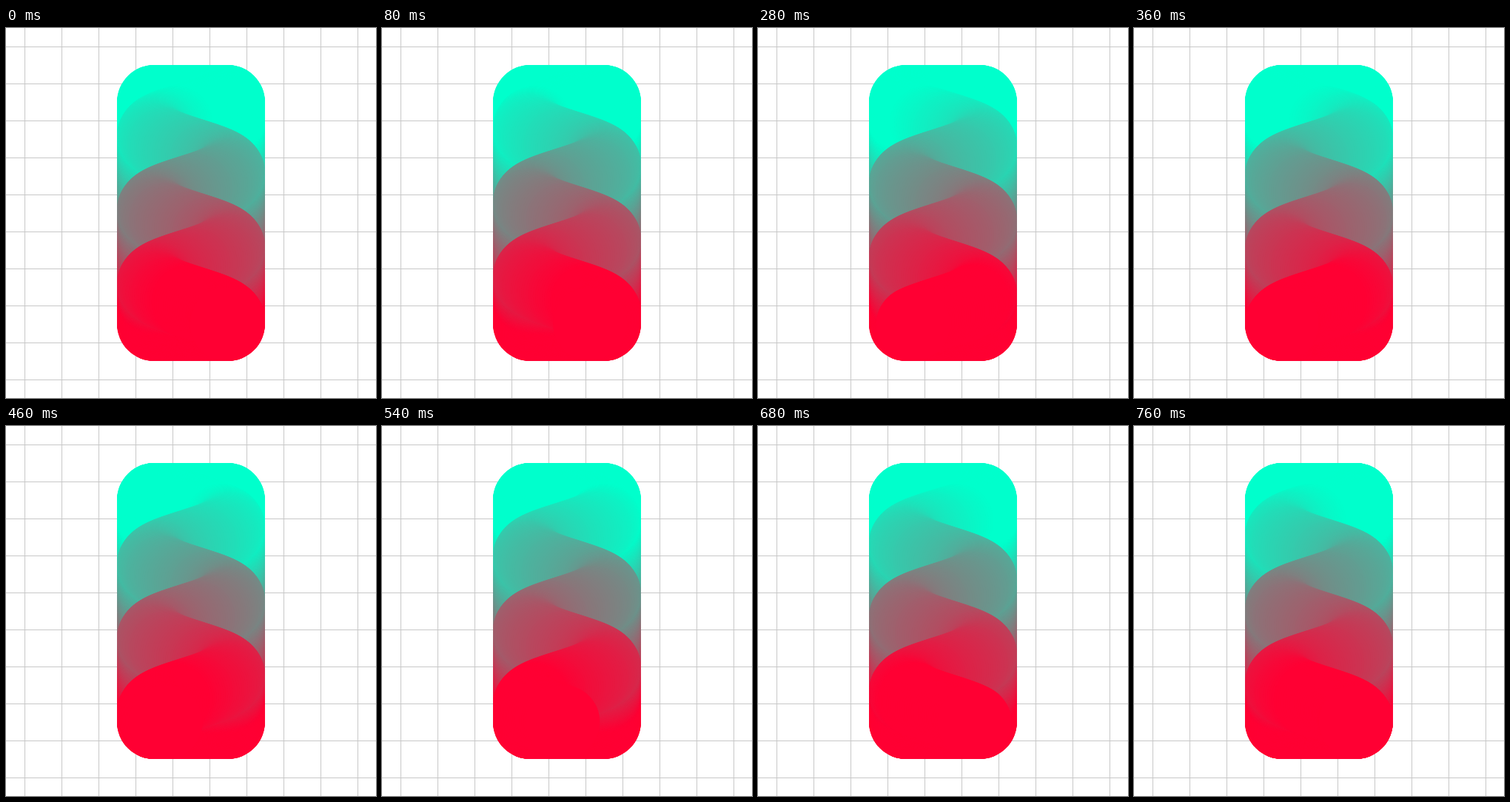
Write an HTML page with a canvas that moves like this. It is 500x500 px and loops after 780 ms.

```html
<!DOCTYPE html>
<html lang="en">
<head>
<meta charset="utf-8">
<title>Ribbon</title>
<style>
  html, body { margin: 0; width: 100%; height: 100%; overflow: hidden; background: #fff; }
  canvas { display: block; width: 500px; height: 500px; }
</style>
</head>
<body>
<canvas id="stage" width="500" height="500"></canvas>
<script>
const SIZE = 500, STEPS = 39, STEP_MS = 20;
const TOP = 100, BOTTOM = 400, CENTER = 250, RADIUS = 50;
const SWING = 50, WAVE = 100, CREST = 196;
const FADE_START = 127, FADE_END = 370;
const BOX = { x: 148, y: 48, w: 204, h: 404 };
const START_COLOR = [0, 255, 204], END_COLOR = [255, 0, 51];

function makeCanvas(w, h) {
  const canvas = document.createElement('canvas');
  canvas.width = w;
  canvas.height = h;
  return canvas;
}

function colorAt(y) {
  const p = Math.min(1, Math.max(0, (y - FADE_START) / (FADE_END - FADE_START)));
  return `rgb(${START_COLOR.map((c, i) => Math.round(c + (END_COLOR[i] - c) * p))})`;
}

function drawRibbon(ctx, step) {
  for (let y = TOP; y <= BOTTOM; y++) {
    const x = CENTER + SWING * Math.cos(2 * Math.PI * ((y - CREST) / WAVE + step / STEPS));
    ctx.fillStyle = colorAt(y);
    ctx.beginPath();
    ctx.arc(x - BOX.x, y - BOX.y, RADIUS, 0, 2 * Math.PI);
    ctx.fill();
  }
}

// The ribbon is never erased: one warm-up cycle leaves the trail that the second records.
function recordCycle() {
  const trail = makeCanvas(BOX.w, BOX.h);
  const ctx = trail.getContext('2d');
  for (let step = 0; step < STEPS; step++) drawRibbon(ctx, step);
  return Array.from({ length: STEPS }, (_, step) => {
    drawRibbon(ctx, step);
    const copy = makeCanvas(BOX.w, BOX.h);
    copy.getContext('2d').drawImage(trail, 0, 0);
    return copy;
  });
}

const stage = document.getElementById('stage').getContext('2d');
const poses = recordCycle();

function drawGrid() {
  stage.fillStyle = '#fff';
  stage.fillRect(0, 0, SIZE, SIZE);
  stage.fillStyle = '#c8c8c8';
  for (let p = 25; p < SIZE; p += 50) {
    stage.fillRect(p, 0, 1, SIZE);
    stage.fillRect(0, p, SIZE, 1);
  }
}

function render(now) {
  const step = Math.floor(now / STEP_MS + 1e-6) % STEPS;
  drawGrid();
  stage.drawImage(poses[step], BOX.x, BOX.y);
}

function loop(now) {
  render(now);
  requestAnimationFrame(loop);
}

render(0);
requestAnimationFrame(loop);
</script>
</body>
</html>
```
